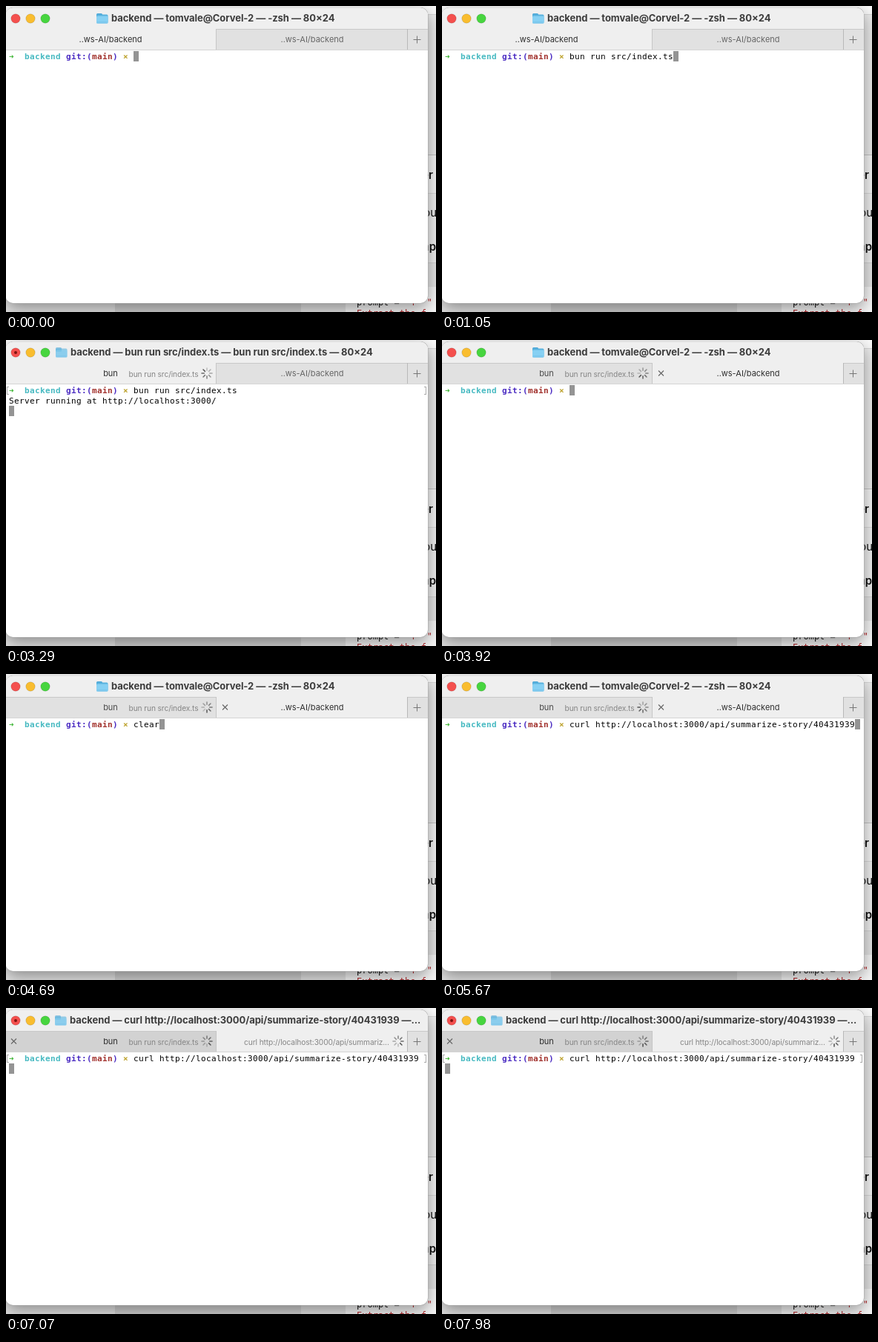
Animation of 580x414 px, one loop 8000 ms. Source, as an HTML page with a canvas:

```html
<!DOCTYPE html>
<html lang="en">
<head>
<meta charset="utf-8">
<title>Terminal session</title>
<style>
html, body { margin: 0; width: 580px; height: 414px; overflow: hidden; }
canvas { display: block; }
</style>
</head>
<body>
<canvas id="stage" width="580" height="414"></canvas>
<script>
const ctx = document.getElementById('stage').getContext('2d');
const LOOP = 8000, TICK = 70, COL = 7, ROW = 14;
const UI = 'Inter, "Open Sans", sans-serif';
const MONO = '"DejaVu Sans Mono", "Noto Sans Mono", monospace';
const RUN = 'bun run src/index.ts';
const CURL = 'curl http://localhost:3000/api/summarize-story/40431939';
const SHELL = 'backend — tomvale@Corvel-2 — -zsh — 80×24';
const FOLDER = '..ws-AI/backend';

// Moments of the session, in ms
const AT = {
  enter: 1960, tabName: 2030, ready: 2170, busy: 2450, hover: 3430, swap: 3640,
  send: 5950, sendTab: 6020, sendBusy: 6650, hoverBack: 7070
};
// [time, text on the command line]
const TYPED = [
  [0, ''], [490, 'b'], [630, 'bu'], [700, 'bun'], [1050, RUN],
  [AT.swap, ''], [4200, 'c'], [4270, 'cl'], [4410, 'cle'], [4480, 'clea'], [4550, 'clear'],
  [4830, ''], [4900, 'c'], [4970, 'cu'], [5040, 'cur'], [5110, 'curl'], [5180, 'curl '], [5460, CURL]
];

function rect(x, y, w, h, color) {
  ctx.fillStyle = color;
  ctx.fillRect(x, y, w, h);
}

function disc(x, y, r, color) {
  ctx.fillStyle = color;
  ctx.beginPath();
  ctx.arc(x, y, r, 0, 7);
  ctx.fill();
}

function rounded(x, y, w, h, r, color) {
  ctx.fillStyle = color;
  ctx.beginPath();
  ctx.roundRect(x, y, w, h, r);
  ctx.fill();
}

function line(color, width, ...p) {
  ctx.strokeStyle = color;
  ctx.lineWidth = width;
  ctx.beginPath();
  for (let i = 0; i < p.length; i += 4) {
    ctx.moveTo(p[i], p[i + 1]);
    ctx.lineTo(p[i + 2], p[i + 3]);
  }
  ctx.stroke();
}

function label(str, x, y, font, color, align = 'left', spacing = 0) {
  ctx.font = font;
  ctx.fillStyle = color;
  ctx.textAlign = align;
  ctx.letterSpacing = spacing + 'px';
  ctx.fillText(str, x, y);
  ctx.letterSpacing = '0px';
}

function cells(str, col, row, color = '#000', weight = '') {
  ctx.font = `${weight} 11px ${MONO}`;
  ctx.fillStyle = color;
  ctx.textAlign = 'left';
  [...str].forEach((ch, i) => ctx.fillText(ch, 4 + (col + i) * COL, 72 + row * ROW));
}

function drawDesktop() {
  rect(0, 0, 580, 414, '#ececec');
  rect(0, 0, 580, 11, '#fafafa');
  rect(0, 11, 580, 1, '#d6d6d6');
  rect(560, 202, 20, 212, '#f6f6f6');
  rect(560, 201, 20, 1, '#c4c4c4');
  rect(560, 253, 20, 95, '#f0f0f0');
  rect(560, 253, 20, 1, '#dadada');
  rect(560, 347, 20, 1, '#d4d4d4');
  rect(560, 348, 20, 32, '#e6e6e6');
  rect(0, 380, 147, 34, '#e6e6e6');
  rect(147, 380, 251, 34, '#d2d2d2');
  rect(398, 380, 60, 34, '#e4e4e4');
  rect(458, 380, 122, 34, '#f7f7f7');
  label('er', 576, 234, `600 15px ${UI}`, '#111', 'right');
  label('ou', 581, 285, `15px ${UI}`, '#111', 'right');
  label('mp', 580, 331, `600 15px ${UI}`, '#111', 'right');
  label('prompt = ', 473, 405, `12px ${MONO}`, '#111');
  label('f"""', 546, 405, `12px ${MONO}`, '#b3262a');
  label('Extract the f', 473, 420, `12px ${MONO}`, '#b3262a');
}

function drawFolder(x, pale) {
  ctx.globalAlpha = pale ? 0.6 : 1;
  rounded(x, 10, 8, 6, 1.5, '#4fa9d8');
  rounded(x, 11.5, 15.5, 12, 1.5, '#58b2de');
  rounded(x, 13.5, 15.5, 10, 1.5, '#86d0f3');
  rect(x + 1, 21.5, 13.5, 0.8, '#6fbde4');
  ctx.globalAlpha = 1;
}

function drawCross(x) {
  line('#666', 1.1, x - 3.5, 41.5, x + 3.5, 48.5, x + 3.5, 41.5, x - 3.5, 48.5);
}

function drawSpinner(x, t) {
  const head = Math.floor(t / TICK) * 8 / 12;
  ctx.lineCap = 'round';
  for (let i = 0; i < 8; i++) {
    const a = i * Math.PI / 4 - Math.PI / 2;
    const age = ((head - i) % 8 + 8) % 8 / 8;
    const c = Math.cos(a), s = Math.sin(a);
    line(`rgba(50,50,50,${0.8 - 0.6 * age})`, 1.6,
      x + 3.7 * c, 45 + 3.7 * s, x + 7 * c, 45 + 7 * s);
  }
  ctx.lineCap = 'butt';
}

function drawTitle(t, second) {
  const running = second ? t >= AT.send : t >= AT.enter;
  [['#f4504e', 13], ['#f9bd2f', 33], ['#47d53f', 53]].forEach(([c, x]) => {
    disc(x, 17, 6.2, c);
    ctx.strokeStyle = 'rgba(0,0,0,.16)';
    ctx.lineWidth = 0.8;
    ctx.stroke();
  });
  if (running) disc(13, 17, 2, '#7c1410');
  let title = SHELL, x = 142;
  if (running && second) {
    title = `backend — ${CURL} —...`;
    x = 86;
  } else if (running) {
    title = `backend — ${RUN} — ${RUN} — 80×24`;
    x = 87;
  }
  drawFolder(x - 20, running);
  label(title, x, 21, `700 13px ${UI}`, '#3c3c3c', 'left', -0.06);
}

function drawTabs(t, second) {
  const back = t >= AT.hoverBack;
  const hover = t >= AT.hover && !back;
  const idle = '#e1e1e1', over = '#d2d2d2', on = '#efefef';
  rect(0, 31, 283, 28, second ? (back ? over : idle) : on);
  rect(284, 31, 257, 28, second ? on : (hover ? over : idle));
  rect(541, 31, 28, 28, idle);
  if (second) rect(0, 31, 284, 1, '#c8c8c8');
  else rect(283, 31, 258, 1, '#c8c8c8');
  rect(541, 31, 28, 1, '#c8c8c8');
  rect(283, 31, 1, 28, '#c6c6c6');
  rect(541, 31, 1, 28, '#b8b8b8');
  rect(0, 59, 569, 1, '#d5d5d5');
  line('#777', 1, 549.5, 45.5, 559.5, 45.5, 554.5, 40.5, 554.5, 50.5);

  const font = `11px ${UI}`, small = `10.2px ${UI}`;
  const bright = '#2e2e2e', dim = '#666', soft = '#858585';
  label(t < AT.tabName ? FOLDER : 'bun', 141, 49, font, second && !back ? '#4a4a4a' : bright, 'center');
  if (t >= AT.busy) {
    label(RUN, 165.5, 50, small, soft, 'left', -0.1);
    drawSpinner(271, t);
  }
  if (t >= AT.sendBusy) {
    label('curl http://localhost:3000/api/summariz...', 321, 50, small, soft, 'left', -0.1);
    drawSpinner(529, t - AT.sendBusy + AT.busy);
  } else {
    label(t < AT.sendTab ? FOLDER : 'curl', 413, 49, font, second ? bright : dim, 'center');
  }
  if (hover) drawCross(295.5);
  if (back) drawCross(10.5);
}

function drawShell(t, second) {
  const command = TYPED.findLast(([at]) => t >= at)[1];
  const sent = second ? t >= AT.send : t >= AT.enter;
  let row = 0, col = 24 + command.length;
  if (sent) {
    row = !second && t >= AT.ready ? 2 : 1;
    col = 0;
    line('#aaa', 1, 4, 63.5, 1, 63.5, 1.5, 63, 1.5, 74, 1, 73.5, 4, 73.5);
    line('#aaa', 1, 564, 63.5, 567, 63.5, 566.5, 63, 566.5, 74, 564, 73.5, 567, 73.5);
  }
  rect(4 + col * COL, 61 + row * ROW, COL, ROW, '#949494');
  cells('➜', 0, 0, '#45b83c', 'bold');
  cells('backend', 3, 0, '#45b9c1', 'bold');
  cells('git:(', 11, 0, '#4a2bc2', 'bold');
  cells('main', 16, 0, '#a02f2a', 'bold');
  cells(')', 20, 0, '#4a2bc2', 'bold');
  cells('×', 22, 0, '#bda22c', 'bold');
  cells(command, 24, 0);
  if (row === 2) cells('Server running at http://localhost:3000/', 0, 1);
}

function draw(t) {
  const second = t >= AT.swap;
  drawDesktop();
  ctx.save();
  ctx.shadowColor = 'rgba(0,0,0,.4)';
  ctx.shadowBlur = 22;
  ctx.shadowOffsetY = 7;
  rounded(-0.5, 2, 570, 400.5, 10, '#a8a8a8');
  ctx.restore();
  ctx.save();
  ctx.beginPath();
  ctx.roundRect(-0.5, 2.5, 569.5, 399.5, 10);
  ctx.clip();
  rect(0, 2, 570, 401, '#fff');
  rect(0, 2, 570, 29, '#efefef');
  drawTitle(t, second);
  drawTabs(t, second);
  drawShell(t, second);
  ctx.restore();
}

const start = performance.now();
function frame(now) {
  draw(Math.max(0, now - start) % LOOP);
  requestAnimationFrame(frame);
}
requestAnimationFrame(frame);
</script>
</body>
</html>
```
